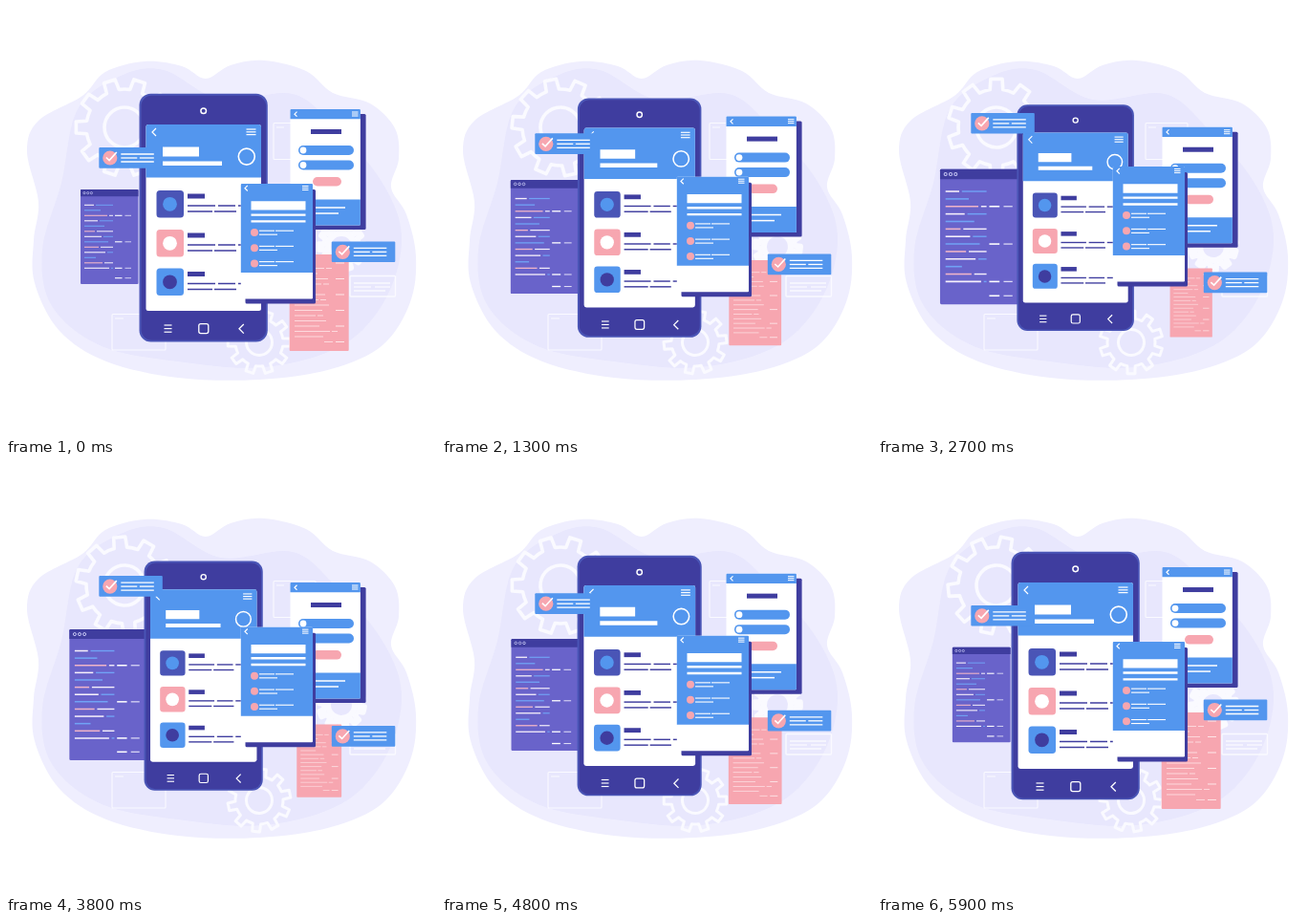
Recreate the animation shown at these times as an HTML page with a canvas. Size 450 by 450 pixels, loop 6000 ms.

```html
<!DOCTYPE html>
<html lang="en">
<head>
<meta charset="utf-8">
<style>
html, body { margin: 0; width: 100%; height: 100%; overflow: hidden; background: #fff; }
canvas { display: block; width: 450px; height: 450px; }
</style>
</head>
<body>
<canvas id="stage" width="450" height="450"></canvas>
<script>
const ctx = document.getElementById('stage').getContext('2d');
const LOOP = 6000, STEP = 100;
const NAVY = '#3f3d9f', INDIGO = '#4a55b6', BLUE = '#5396ee', PINK = '#f7a6b0';
const WHITE = '#fff', PURPLE = '#6963ca', PALE = '#fafaff';

function box(x, y, w, h, color, r = 0) {
  ctx.fillStyle = color;
  ctx.beginPath();
  ctx.roundRect(x, y, w, h, r);
  ctx.fill();
}

function dot(x, y, r, color) {
  ctx.fillStyle = color;
  ctx.beginPath();
  ctx.arc(x, y, r, 0, Math.PI * 2);
  ctx.fill();
}

function ring(x, y, r, color, width) {
  ctx.strokeStyle = color;
  ctx.lineWidth = width;
  ctx.beginPath();
  ctx.arc(x, y, r, 0, Math.PI * 2);
  ctx.stroke();
}

function line(points, color = WHITE, width = 1.4) {
  ctx.strokeStyle = color;
  ctx.lineWidth = width;
  ctx.beginPath();
  points.forEach(([x, y]) => ctx.lineTo(x, y));
  ctx.stroke();
}

const dash = (x1, x2, y, color, width) => line([[x1, y], [x2, y]], color, width);

function frame(x, y, w, h, color, width, r = 1) {
  ctx.strokeStyle = color;
  ctx.lineWidth = width;
  ctx.beginPath();
  ctx.roundRect(x, y, w, h, r);
  ctx.stroke();
}

function menu(x, y, w, gap, width = 1.2) {
  for (let i = -1; i <= 1; i++) dash(x, x + w, y + i * gap, WHITE, width);
}

const chevron = (x, y, s, width = 1.2) => line([[x + s, y - s], [x, y], [x + s, y + s]], WHITE, width);

function shifted(dx, dy, draw) {
  ctx.save();
  ctx.translate(dx, dy);
  draw();
  ctx.restore();
}

function scaled(cx, cy, s, draw) {
  ctx.save();
  ctx.translate(cx, cy);
  ctx.scale(s, s);
  ctx.translate(-cx, -cy);
  draw();
  ctx.restore();
}

// Closed Catmull-Rom curve
function blob(points, color) {
  const n = points.length, at = i => points[(i + n) % n];
  ctx.fillStyle = color;
  ctx.beginPath();
  ctx.moveTo(...points[0]);
  for (let i = 0; i < n; i++) {
    const [a, b, c, d] = [at(i - 1), at(i), at(i + 1), at(i + 2)];
    ctx.bezierCurveTo(b[0] + (c[0] - a[0]) / 6, b[1] + (c[1] - a[1]) / 6,
      c[0] - (d[0] - b[0]) / 6, c[1] - (d[1] - b[1]) / 6, c[0], c[1]);
  }
  ctx.fill();
}

function gear(x, y, outer, inner, hole, angle, width) {
  const teeth = 10, pitch = Math.PI * 2 / teeth;
  ctx.save();
  ctx.translate(x, y);
  ctx.rotate(angle);
  ctx.strokeStyle = PALE;
  ctx.lineWidth = width;
  ctx.lineJoin = 'round';
  ctx.beginPath();
  for (let i = 0; i < teeth; i++) {
    const a = i * pitch;
    for (const [k, r] of [[-0.27, inner], [-0.19, outer], [0.19, outer], [0.27, inner]])
      ctx.lineTo(r * Math.cos(a + k * pitch), r * Math.sin(a + k * pitch));
    ctx.arc(0, 0, inner, a + 0.27 * pitch, a + 0.73 * pitch);
  }
  ctx.closePath();
  ctx.stroke();
  ring(0, 0, hole, PALE, width);
  ctx.restore();
}

function background(angle) {
  blob([[22, 152], [34, 120], [80, 94], [104, 69], [145, 58], [184, 63], [209, 76],
    [235, 62], [270, 57], [314, 68], [342, 91], [381, 102], [407, 128], [411, 160],
    [403, 190], [419, 218], [429, 262], [423, 310], [394, 355], [340, 380],
    [265, 391], [180, 389], [105, 372], [56, 340], [30, 290], [29, 245], [34, 205]], '#efeefe');
  blob([[75, 108], [120, 73], [165, 67], [225, 98], [300, 92], [345, 128], [392, 182],
    [414, 240], [398, 305], [352, 355], [270, 378], [180, 372], [100, 356], [48, 314],
    [38, 255], [58, 185]], '#e8e7fd');
  gear(124, 127, 51, 40, 21, angle, 3.6);
  gear(265, 352, 33, 25, 13.5, -angle, 3);
  gear(351, 252, 24, 18, 14, angle, 6);
  frame(111, 322.5, 56, 37.5, PALE, 1.1);
  dash(114, 123, 327, PALE, 1);
  frame(280, 122.5, 44, 38, PALE, 1.1);
  dash(283, 291, 127, PALE, 1);
  frame(360, 282.5, 47.5, 21.5, PALE, 1.3);
  dash(364, 402, 290, PALE, 1.4);
  dash(364, 382, 294, PALE, 1.4);
  dash(386, 402, 294, PALE, 1.4);
  dash(364, 397, 298, PALE, 1.4);
}

function codeTail(y) {
  dash(114, 121.5, y, WHITE, 1.1);
  dash(124.5, 131, y, '#dcdaf6', 0.9);
}

function codeWindow() {
  box(78, 192, 60.5, 99, PURPLE, 1);
  box(78, 192, 60.5, 7.3, NAVY, [1, 1, 0, 0]);
  for (let i = 0; i < 3; i++) ring(82 + i * 3.7, 195.7, 1.1, '#c8c9f5', 0.7);
  const tints = ['#f6f0fb', '#70a2f5', '#efb4c8'];
  for (let i = 0; i < 13; i++) {
    const y = 208.3 + i * 5.5;
    const split = 92 + (i * 7) % 17;
    dash(82, split, y, tints[i % 3], 1.1);
    if (i % 3 !== 1) dash(split + 2, 112, y, tints[(i + 1) % 3], 1);
    if (i % 5 === 2) codeTail(y);
  }
  codeTail(284.7);
}

function pinkSheet() {
  box(296.7, 260, 62, 101, PINK, 1);
  for (let i = 0; i < 16; i++) {
    const y = 269 + i * 5.5;
    const start = i === 15 ? 333 : 302;
    const end = i === 15 ? 342 : 322 + (i * 11) % 18;
    dash(start, end, y, '#fdd9dd', 1);
    if (i % 3 === 0) dash(345, 354, y, '#fde7e9', 1);
    else if (i % 3 === 1) dash(end + 2, end + 8, y, '#fdd9dd', 1);
  }
}

function listRow(y, tile, mark) {
  box(157.5, y, 28.5, 28.5, tile, 3.5);
  dot(171.5, y + 14.3, 7.4, mark);
  box(190, y + 3.5, 18, 5, NAVY);
  dash(190, 219, y + 16, NAVY, 1.5);
  dash(222, 240, y + 16, NAVY, 1.5);
  dash(243, 252, y + 16, NAVY, 1.5);
  dash(190, 216, y + 22, NAVY, 1.5);
  dash(218, 241, y + 22, NAVY, 1.5);
}

function phone() {
  box(139.5, 91.8, 134.3, 259.6, INDIGO, 12);
  box(141.5, 93.8, 130.5, 256, NAVY, 11);
  ring(206.7, 109.8, 2.8, WHITE, 1.5);
  box(146.5, 124, 120.5, 195, WHITE, 2.5);
  box(146.5, 124, 120.5, 55.5, BLUE, [2.5, 2.5, 0, 0]);
  chevron(153, 132, 4);
  menu(251.5, 131.8, 10, 2.8);
  box(164, 147.5, 38, 10, WHITE);
  box(164, 162.5, 62, 4.5, WHITE);
  ring(251.8, 157.6, 8.5, WHITE, 1.6);
  listRow(193, INDIGO, BLUE);
  listRow(234, PINK, WHITE);
  listRow(274.5, BLUE, NAVY);
  menu(165.5, 337.6, 8, 3.6);
  frame(201.8, 332.6, 10, 10, WHITE, 1.3, 2);
  chevron(244, 337.8, 4.8, 1.3);
}

function formWindow() {
  box(303, 113, 73.6, 121, NAVY, 1.5);
  box(297.5, 108, 73.4, 121.5, WHITE, 1);
  box(297.5, 108, 73.4, 10.3, BLUE, [1, 1, 0, 0]);
  chevron(302, 113.2, 2.5);
  menu(362, 113, 6.5, 2, 1);
  box(319, 129, 32, 5, NAVY);
  for (const y of [146, 161.5]) {
    box(306, y, 58, 10, BLUE, 5);
    dot(311, y + 5, 3.4, WHITE);
  }
  box(321, 179, 30, 9.5, PINK, 4.8);
  box(297.5, 202.5, 73.4, 27, BLUE, [0, 0, 1, 1]);
  dash(318, 355, 211, WHITE, 1.5);
  dash(318, 348, 217, WHITE, 1.5);
}

function frontWindow() {
  box(250.5, 192, 73.5, 119.5, NAVY, 1.5);
  box(245.8, 186, 75.2, 120.5, WHITE, 1);
  box(245.8, 186, 75.2, 93, BLUE, [1, 1, 0, 0]);
  chevron(250, 190.7, 2.8);
  menu(310, 190.5, 6.5, 2, 1);
  box(256.5, 204.3, 57, 9.3, WHITE);
  dash(256.5, 313.5, 218.6, WHITE, 2.4);
  dash(256.5, 313.5, 225.4, WHITE, 2.4);
  for (let i = 0; i < 3; i++) {
    const y = 237 + i * 16.2;
    dot(260, y, 4, PINK);
    dash(265, 281, y - 1.8, WHITE, 1.1);
    dash(282, 301, y - 1.8, WHITE, 1.1);
    dash(265, 284, y + 2.2, WHITE, 1.1);
  }
}

function notice(x, y) {
  shifted(x, y, () => {
    box(0, 0, 66.5, 21.7, BLUE, 1);
    dot(11.5, 11, 7.6, PINK);
    line([[7.5, 10.5], [10.8, 13.5], [18.5, 5]], WHITE, 1.6);
    dash(23, 57.5, 7, WHITE, 1.3);
    dash(23, 40, 11, WHITE, 1.3);
    dash(42.5, 57.5, 11, WHITE, 1.3);
    dash(23, 57.5, 15, WHITE, 1.3);
  });
}

function render(now) {
  const t = Math.floor(now % LOOP / STEP) * STEP;
  const turn = t / LOOP * Math.PI * 2;
  const sway = (1 - Math.cos(turn)) / 2;
  const swell = sway + 0.08 * Math.abs(Math.sin(turn));

  ctx.fillStyle = WHITE;
  ctx.fillRect(0, 0, 450, 450);
  background(turn);
  scaled(108.3, 241.5, 1 + 0.43 * swell, codeWindow);
  scaled(327.7, 310.7, 1 - 0.293 * sway, pinkSheet);
  scaled(206.6, 221.6, 1 - 0.09 * sway, phone);
  shifted(0, 19.2 * sway, formWindow);
  shifted(0, -18.4 * sway, frontWindow);
  notice(97.3, 148 - 37 * sway);
  notice(340.8, 246.4 + 33 * sway);
}

const start = performance.now();
function tick() {
  render(performance.now() - start);
  requestAnimationFrame(tick);
}
tick();
</script>
</body>
</html>
```
